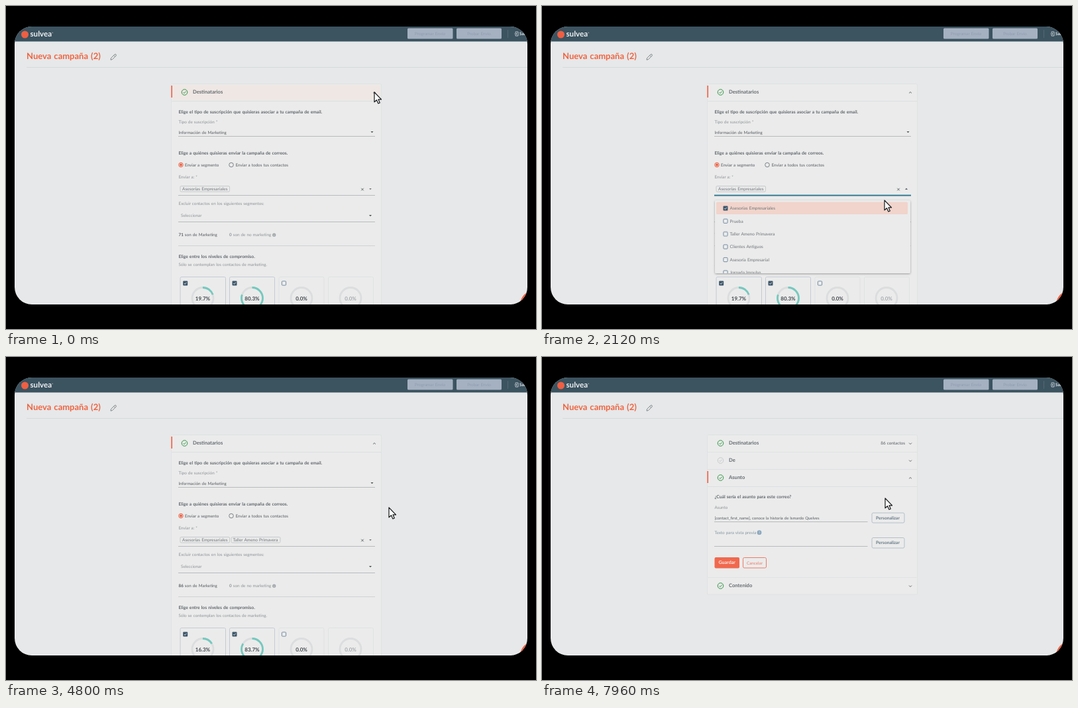
An HTML page that plays this animation: 800 by 487 pixels, repeating every 8000 ms.

```html
<!DOCTYPE html>
<html lang="es">
<head>
<meta charset="utf-8">
<title>Nueva campaña</title>
<style>
html, body { margin: 0; width: 100%; height: 100%; overflow: hidden; background: #000; }
svg { display: block; width: 100%; height: 100%; }
text { font: 6.3px Lato, sans-serif; word-spacing: .07em; fill: #555b60; text-rendering: geometricPrecision; }
.title { font-size: 13px; font-weight: 700; fill: #f0633f; }
.brand { font-size: 11.6px; font-weight: 700; fill: #eef1f2; }
.head { font-size: 7.6px; font-weight: 700; fill: #646b70; }
.ask { font-size: 6.7px; font-weight: 700; fill: #5f666b; }
.label { fill: #8d9397; }
.item { font-size: 6.5px; fill: #6f757a; }
.ghost { fill: #8f9db0; text-anchor: middle; }
.pct { font-size: 8px; font-weight: 700; fill: #42484d; text-anchor: middle; }
.pill { font-size: 6.6px; font-weight: 700; fill: #667987; text-anchor: middle; }
.end { font-size: 6.4px; text-anchor: end; }
.bold { font-weight: 700; }
.line { stroke: #b7babc; stroke-width: 1; }
.rule { stroke: #dcdfe0; stroke-width: 1; }
.stroke { fill: none; stroke: #62696e; stroke-width: 1; }
.panel { fill: #ebebeb; stroke: #dfe2e3; }
.page { fill: #e6e8e9; }
.coral { fill: #ee6a50; }
.arc { fill: none; stroke: #74c9be; stroke-width: 2.8; }
.track { fill: none; stroke: #dbddde; stroke-width: 2.8; }
.card { fill: none; stroke: #c3cbd6; }
.soft { stroke: #dfe1e3; }
.ok { stroke: #2f9443; }
.off { stroke: #c6c9cb; }
.tint { fill: #efe7e4; }

.sw { animation: 8s step-end infinite; }
.open { animation-name: open; }
.closed { animation-name: closed; }
.picked { animation-name: picked; }
.unpicked { animation-name: unpicked; }
.before { animation-name: before; }
.after { animation-name: after; }
.push { animation-name: push; }
.first { animation-name: first; }
.folded { animation-name: folded; }
.summary { animation-name: summary; }
.third { animation-name: third; }
.hoverTop { animation-name: hoverTop; }
.hoverSubject { animation-name: hoverSubject; }
.hover2 { animation-name: hover2; }
.hover3 { animation-name: hover3; }
.rest { animation: rest 8s cubic-bezier(.4, 0, .2, 1) infinite; }
.last { animation: last 8s cubic-bezier(.4, 0, .2, 1) infinite; }
.cursor { animation: cursor 8s ease-in-out infinite; }

@keyframes open { 0% { opacity: 0 } 15.5% { opacity: 1 } 53%, to { opacity: 0 } }
@keyframes closed { 0% { opacity: 1 } 15.5% { opacity: 0 } 53%, to { opacity: 1 } }
@keyframes picked { 0% { opacity: 0 } 42.5%, to { opacity: 1 } }
@keyframes unpicked { 0% { opacity: 1 } 42.5%, to { opacity: 0 } }
@keyframes before { 0% { opacity: 1 } 53%, to { opacity: 0 } }
@keyframes after { 0% { opacity: 0 } 53%, to { opacity: 1 } }
@keyframes push { 0% { transform: none } 43% { transform: translateY(21.5px) } 53%, to { transform: none } }
@keyframes first { 0% { opacity: 1 } 69%, to { opacity: 0 } }
@keyframes folded { 0% { opacity: 0 } 69%, to { opacity: 1 } }
@keyframes summary { 0% { opacity: 1 } 87%, to { opacity: 0 } }
@keyframes third { 0% { opacity: 0 } 87%, to { opacity: 1 } }
@keyframes hoverTop { 0% { opacity: 1 } 4% { opacity: 0 } 66.5% { opacity: 1 } 77%, to { opacity: 0 } }
@keyframes hoverSubject { 0% { opacity: 0 } 81% { opacity: 1 } 96.5%, to { opacity: 0 } }
@keyframes hover2 { 0% { opacity: 0 } 29.5% { opacity: 1 } 32.5%, to { opacity: 0 } }
@keyframes hover3 { 0% { opacity: 0 } 32.5% { opacity: 1 } 44%, to { opacity: 0 } }
@keyframes rest { 0%, 69% { transform: translateY(420px) } 71.8%, to { transform: none } }
@keyframes last { 0%, 87% { transform: none } 89.8%, to { transform: translateY(137px) } }
@keyframes cursor {
  0%, 1% { transform: translate(556px, 130px) }
  9.5% { transform: translate(521px, 242px) }
  14%, 19% { transform: translate(517px, 273px) }
  26.5% { transform: translate(517px, 293px) }
  31.5% { transform: translate(505px, 329px) }
  36% { transform: translate(405px, 356px) }
  40%, 43.5% { transform: translate(346px, 344px); animation-timing-function: linear }
  47.5% { transform: translate(438.5px, 286px); animation-timing-function: ease-out }
  51.5%, 53.5% { transform: translate(616px, 231px) }
  60%, 63.5% { transform: translate(578px, 227px) }
  67.5%, 74% { transform: translate(556px, 130px) }
  83%, 89% { transform: translate(558px, 182px) }
  95% { transform: translate(555px, 183px) }
  99.5%, to { transform: translate(518px, 213px) }
}
</style>
</head>
<body>
<svg viewBox="0 0 800 487">
<defs>
  <clipPath id="screen"><rect x="13" y="31" width="774" height="419" rx="26"/></clipPath>
  <clipPath id="listClip"><rect x="261" y="293" width="295" height="109.5"/></clipPath>
  <filter id="shadow" x="-10%" y="-10%" width="120%" height="125%"><feDropShadow dx="0" dy="1" stdDeviation="1.6" flood-opacity=".35"/></filter>
  <g id="done" fill="none"><circle r="4.3"/><path d="M-2 .1L-.5 1.6 2.2-1.4"/></g>
  <path id="up" class="stroke" d="M-2 1L0-1 2 1"/>
  <path id="down" class="stroke" d="M-2-1L0 1 2-1"/>
  <path id="caret" d="M-2-1H2L0 1.3z" fill="#4f555a"/>
  <g id="ticked"><rect x="-3.5" y="-3.5" width="7" height="7" rx="1" fill="#3d566a"/><path d="M-1.8 0L-.5 1.4 1.9-1.3" fill="none" stroke="#eee" stroke-width=".9"/></g>
  <rect id="empty" x="-3.1" y="-3.1" width="6.2" height="6.2" rx="1" fill="#ededed" stroke="#67829a" stroke-width=".9"/>
  <circle id="ring" class="track" r="16"/>
</defs>

<g clip-path="url(#screen)">
  <rect class="page" width="800" height="487"/>
  <rect class="panel" x="249.5" y="117.5" width="317" height="500" rx="2"/>

  <!-- recipients form -->
  <text class="ask" x="260.5" y="162">Elige el tipo de suscripción que quisieras asociar a tu campaña de email.</text>
  <text class="label" x="260.5" y="177">Tipo de suscripción *</text>
  <text x="260.5" y="193">Información de Marketing</text>
  <use href="#caret" x="552.5" y="190"/>
  <path class="line" d="M260 196.5H557"/>
  <text class="ask" x="260.5" y="223.5">Elige a quiénes quisieras enviar la campaña de correos.</text>
  <circle cx="264" cy="239.5" r="3.3" fill="none" stroke="#ee5a3c"/><circle cx="264" cy="239.5" r="1.9" fill="#ee5a3c"/>
  <text x="270" y="241.7">Enviar a segmento</text>
  <circle cx="340" cy="239.5" r="3.3" fill="none" stroke="#70767b" stroke-width=".9"/>
  <text x="346.5" y="241.7">Enviar a todos tus contactos</text>
  <text class="label" x="260.5" y="259.7">Enviar a: *</text>
  <rect x="263" y="271.5" width="74.5" height="8.5" rx="1.5" fill="none" stroke="#c6c9cb"/>
  <text class="item" x="266" y="278">Asesorías Empresariales</text>
  <g class="sw picked">
    <rect x="340" y="271.5" width="74" height="8.5" rx="1.5" fill="none" stroke="#c6c9cb"/>
    <text class="item" x="342.5" y="278">Taller Ameno Primavera</text>
  </g>
  <path class="stroke" stroke-width=".8" d="M536.2 274.7l3.6 3.6m0-3.6l-3.6 3.6"/>
  <use class="sw closed" href="#caret" x="550" y="275.5"/>
  <path class="line" d="M260 285.5H557"/>
  <text class="label" x="260.5" y="300">Excluir contactos en los siguientes segmentos:</text>
  <text class="label" x="264" y="318.3">Seleccionar</text>
  <use href="#caret" x="550" y="316"/>
  <path class="line" d="M260 325.5H557"/>
  <text x="260.5" y="347" class="sw before"><tspan class="bold">71</tspan> son de Marketing</text>
  <text x="260.5" y="347" class="sw after"><tspan class="bold">86</tspan> son de Marketing</text>
  <text class="label" x="337" y="347"><tspan class="bold">0</tspan> son de no marketing</text>
  <circle cx="404.7" cy="345.2" r="2.6" fill="#a3a8ab"/><path d="M404.7 344.6v2" stroke="#eee" stroke-width=".7"/>

  <g class="sw push">
    <path class="rule" style="stroke:#cfd2d3" d="M260 361.5H557"/>
    <text class="ask" x="260.5" y="380.2">Elige entre los niveles de compromiso.</text>
    <text class="label" x="260.5" y="391.8">Sólo se contemplan los contactos de marketing.</text>
    <rect class="card" x="263" y="408.5" width="68.5" height="80" rx="2"/>
    <rect class="card" x="337.5" y="408.5" width="68" height="80" rx="2"/>
    <rect class="card soft" x="412" y="408.5" width="68" height="80" rx="2"/>
    <rect class="card soft" x="486.5" y="408.5" width="68" height="80" rx="2"/>
    <use href="#ticked" x="270.7" y="418"/>
    <use href="#ticked" x="345" y="418"/>
    <use href="#empty" x="419.5" y="418"/>
    <use href="#ring" x="297" y="440.5"/><use href="#ring" x="371.5" y="440.5"/>
    <use href="#ring" x="446" y="440.5"/><use href="#ring" x="520" y="440.5"/>
    <g class="sw before">
      <circle class="arc" r="16" pathLength="100" stroke-dasharray="19.7 100" transform="translate(297 440.5) rotate(-90)"/>
      <circle class="arc" r="16" pathLength="100" stroke-dasharray="80.3 100" transform="translate(371.5 440.5) rotate(-90)"/>
      <text class="pct" x="297" y="443.5">19.7%</text><text class="pct" x="371.5" y="443.5">80.3%</text>
    </g>
    <g class="sw after">
      <circle class="arc" r="16" pathLength="100" stroke-dasharray="16.3 100" transform="translate(297 440.5) rotate(-90)"/>
      <circle class="arc" r="16" pathLength="100" stroke-dasharray="83.7 100" transform="translate(371.5 440.5) rotate(-90)"/>
      <text class="pct" x="297" y="443.5">16.3%</text><text class="pct" x="371.5" y="443.5">83.7%</text>
    </g>
    <text class="pct" x="446" y="443.5">0.0%</text>
    <text class="pct" x="520" y="443.5" style="fill:#a6aaad">0.0%</text>
  </g>

  <!-- segment list -->
  <g class="sw open">
    <rect x="260" y="284.6" width="297" height="1.9" fill="#2b7690"/>
    <use href="#caret" transform="translate(550 275.8) scale(1 -1)"/>
    <rect x="261" y="293" width="295" height="110" rx="2" fill="#ebebeb" filter="url(#shadow)"/>
    <g clip-path="url(#listClip)">
      <rect x="263" y="295.5" width="289" height="18.5" rx="1.5" fill="#f1d4cb"/>
      <rect class="sw hover2 tint" x="263" y="315" width="289" height="18.5"/>
      <rect class="sw hover3 tint" x="263" y="334.5" width="289" height="18.5"/>
      <rect class="sw picked" x="263" y="334.5" width="289" height="18.5" rx="1.5" fill="#f1d4cb"/>
      <use href="#ticked" x="277" y="305"/><text class="item" x="283.5" y="306.8">Asesorías Empresariales</text>
      <use href="#empty" x="277" y="324.3"/><text class="item" x="283.5" y="326.5">Prueba</text>
      <use class="sw unpicked" href="#empty" x="277" y="343.7"/>
      <use class="sw picked" href="#ticked" x="277" y="343.7"/><text class="item" x="283.5" y="345.8">Taller Ameno Primavera</text>
      <use href="#empty" x="277" y="363"/><text class="item" x="283.5" y="365.2">Clientes Antiguos</text>
      <use href="#empty" x="277" y="382.5"/><text class="item" x="283.5" y="384.8">Asesoría Empresarial</text>
      <use href="#empty" x="277" y="402"/><text class="item" x="283.5" y="404.2">Jornada Impulso</text>
    </g>
  </g>

  <!-- recipients heading -->
  <rect class="sw hoverTop tint" x="252" y="119" width="313" height="23"/>
  <path class="rule" d="M250 143.5H567"/>
  <rect class="sw first coral" x="249.3" y="120" width="1.8" height="18"/>
  <use href="#done" class="ok" x="269.5" y="130"/>
  <text class="head" x="282" y="131.7">Destinatarios</text>
  <use class="sw first" href="#up" x="556" y="130.5"/>
  <g class="sw folded"><use href="#down" x="556" y="130.5"/><text class="end" x="548" y="132.3">86 contactos</text></g>

  <!-- following sections -->
  <g class="rest">
    <rect class="page" x="240" y="144" width="336" height="700"/>
    <rect class="panel" x="249.5" y="143.5" width="317" height="220"/>
    <rect class="sw hoverSubject tint" x="252" y="171" width="313" height="23"/>
    <path class="rule" d="M250 169.5H567M250 195.5H567"/>
    <use href="#done" class="off" x="269.5" y="156"/>
    <text class="head" x="282" y="157.7">De</text>
    <use href="#down" x="556" y="156.5"/>
    <rect class="sw third coral" x="249.3" y="172" width="1.8" height="18"/>
    <use href="#done" class="ok" x="269.5" y="182"/>
    <text class="head" x="282" y="183.7">Asunto</text>
    <g class="sw summary"><use href="#down" x="556" y="182.5"/><text class="end" x="548" y="184">[contact_first_name], conoce la histo...</text></g>
    <use class="sw third" href="#up" x="556" y="182.5"/>

    <text class="ask" x="260.5" y="213.3">¿Cuál sería el asunto para este correo?</text>
    <text class="label" x="260.5" y="229">Asunto</text>
    <text x="260.5" y="244.5" style="font-size:6px">[contact_first_name], conoce la historia de Ismardo Quelves</text>
    <path class="line" d="M260 248.5H491.5M260 285.5H491.5"/>
    <text class="label" x="260.5" y="266.8" style="fill:#8496a3">Texto para vista previa</text>
    <circle cx="328" cy="264.7" r="3.4" fill="#8ba8c0"/>
    <text x="328" y="266.6" text-anchor="middle" style="font-size:5px;fill:#eee">?</text>
    <rect x="498" y="235" width="49" height="15" rx="2" fill="none" stroke="#b3c0c9"/>
    <text class="pill" x="522" y="244.6">Personalizar</text>
    <rect x="498" y="272.5" width="49" height="15.5" rx="2" fill="none" stroke="#b3c0c9"/>
    <text class="pill" x="522" y="282">Personalizar</text>
    <rect x="260.5" y="302" width="37.5" height="16.5" rx="2" fill="#f0694e"/>
    <text class="pill" x="279.2" y="312.3" style="fill:#fbe9e4;font-size:7.1px">Guardar</text>
    <rect x="303.5" y="302.5" width="35" height="15.5" rx="2" fill="none" stroke="#ee7a64"/>
    <text x="321" y="312.5" text-anchor="middle" style="fill:#ee7a64">Cancelar</text>

    <g class="last">
      <rect class="page" x="240" y="196" width="336" height="700"/>
      <rect class="panel" x="249.5" y="195.5" width="317" height="25.5" rx="1"/>
      <use href="#done" class="ok" x="269.5" y="208"/>
      <text class="head" x="282" y="209.7">Contenido</text>
      <use href="#down" x="556" y="208.5"/>
    </g>
  </g>

  <!-- top bar -->
  <rect x="13" y="31" width="774" height="22.5" fill="#3c5360"/>
  <circle cx="28.5" cy="43" r="5.5" fill="#ee5f43"/>
  <text class="brand" x="36.5" y="46">sulvea<tspan font-size="3" dy="-4" style="font-size:3px">™</tspan></text>
  <rect x="606" y="33.5" width="68.5" height="16" rx="1.5" fill="#a5b1c1"/>
  <rect x="680" y="33.5" width="68" height="16" rx="1.5" fill="#a5b1c1"/>
  <text class="ghost" x="640" y="43.8">Programar Envío</text>
  <text class="ghost" x="714" y="43.8">Probar Envío</text>
  <path d="M757.5 36V48" stroke="#526875"/>
  <path d="M769 40.5V39H773V45H769V43.5M767.5 42H771M769.8 40.7L771.2 42 769.8 43.3" fill="none" stroke="#dfe4e7" stroke-width=".8"/>
  <text class="bold" x="775" y="44.3" style="fill:#e3e8ea">Salir</text>
  <text class="title" x="31" y="80.3">Nueva campaña (2)</text>
  <path d="M158 81.2L158.6 78.4 164 73Q165 72.3 166 73.2 166.8 74.2 166 75.1L160.6 80.5ZM162.6 74.4L164.7 76.5" fill="none" stroke="#777d82" stroke-width=".9"/>
  <path class="rule" style="stroke:#d7dadb" d="M31 92.5H787"/>
  <circle cx="797" cy="450" r="21" fill="#ee5f43"/>
</g>

<path class="cursor" d="M0 0V14.8L3.5 11.7 5.9 17 8.3 16 6 10.8H10.6Z" fill="#fff" stroke="#16181a" stroke-width="1.2" stroke-linejoin="round"/>
</svg>
</body>
</html>
```
